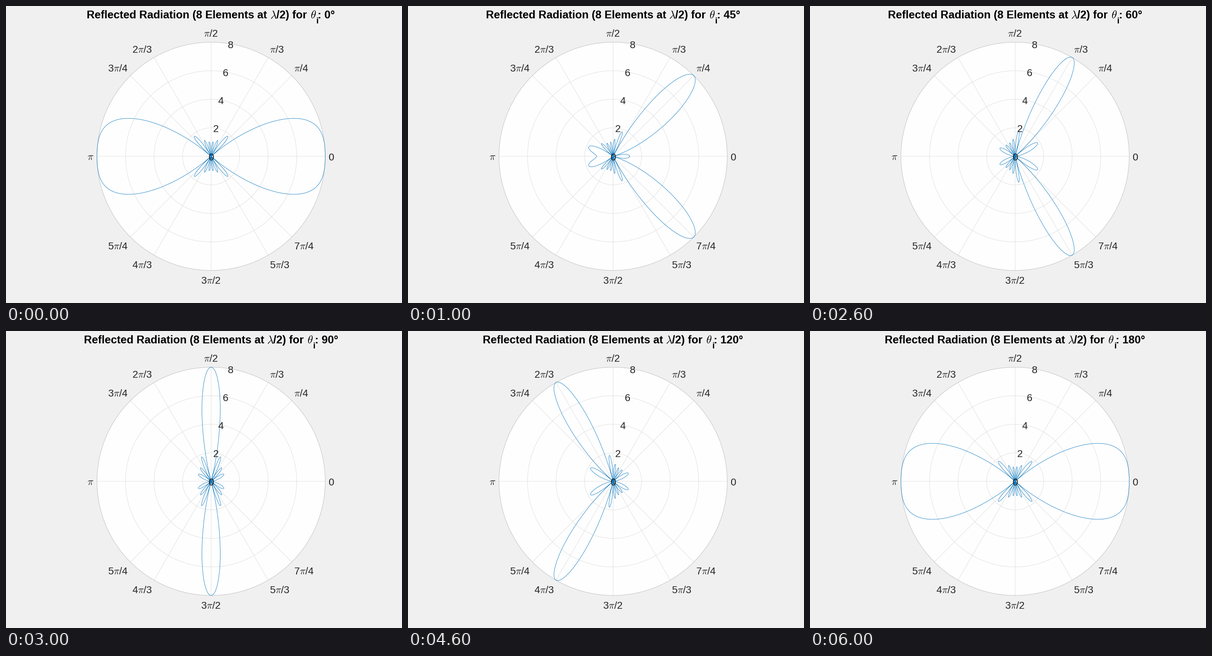
These frames come from a looping animation (864 px wide and 648 px high, 7 s). A matplotlib script:

```python
import numpy as np
import matplotlib.pyplot as plt
from matplotlib.animation import FuncAnimation

W, H, DPI = 864, 648, 100
CX, CY, R = 447.5, 328, 249
ELEMENTS = 8
ANGLES = [0, 45, 60, 90, 120, 135, 180]
PX = 72 / DPI  # points per pixel
GRID, RIM, INK, BLUE = "#dfdfdf", "#c0c0c0", "#262626", "#0072bd"

plt.rcParams["font.family"] = "Liberation Sans"
plt.rcParams["mathtext.fontset"] = "cm"

fig = plt.figure(figsize=(W / DPI, H / DPI), dpi=DPI, facecolor="#f0f0f0")
ax = fig.add_axes([0, 0, 1, 1])
ax.set_xlim(0, W)
ax.set_ylim(H, 0)
ax.axis("off")

theta = np.linspace(0, 2 * np.pi, 2001)


def to_xy(angle, radius):
    """Polar to stage pixels, radius in data units (0 to 8)."""
    r = radius * R / ELEMENTS
    return CX + r * np.cos(angle), CY - r * np.sin(angle)


def stroke(x, y, color, z, width=0.9):
    return ax.plot(x, y, color=color, lw=width * PX, zorder=z, snap=False)[0]


def label(x, y, s, size=22, color=INK, **kw):
    return ax.text(x, y, s, fontsize=size * PX, color=color, zorder=5,
                   va="baseline", **kw)


def array_factor(incidence):
    psi = np.pi * (np.cos(theta) - np.cos(np.radians(incidence)))
    return abs(sum(np.exp(1j * n * psi) for n in range(ELEMENTS)))


# Polar grid
ax.fill(*to_xy(theta, 8), color="#fefefe", lw=0, zorder=0)
for deg in (0, 45, 60, 90, 120, 135, 180, 225, 240, 270, 300, 315):
    x, y = to_xy(np.radians(deg), 8)
    stroke([CX, x], [CY, y], GRID, 1)
for r in (2, 4, 6):
    stroke(*to_xy(theta, r), GRID, 1)
stroke(*to_xy(theta, 8), RIM, 2)

# Tick labels: text, centre x, centre y
ticks = [
    ("0", 709.5, 329), (r"$\pi$/4", 644, 135), (r"$\pi$/3", 591, 94),
    (r"$\pi$/2", 447, 59), (r"2$\pi$/3", 297, 94), (r"3$\pi$/4", 244, 135),
    (r"$\pi$", 184, 329), (r"5$\pi$/4", 244, 523), (r"4$\pi$/3", 297, 564),
    (r"3$\pi$/2", 446.5, 598), (r"5$\pi$/3", 597, 564),
    (r"7$\pi$/4", 650, 523),
]
ticks += [(str(r), 447 + 5.4 * r, 329 - 30.65 * r) for r in range(0, 9, 2)]
for s, x, y in ticks:
    label(x, y + 7.7, s, ha="center")

# Title pieces, placed for a two-digit angle
pieces = [
    (169.5, 27, "Reflected Radiation (8 Elements at ", 24, "bold"),
    (569, 27, r"$\lambda$", 24, "normal"),
    (583, 27, "/2) for ", 24, "bold"),
    (657, 27, r"$\theta$", 24, "normal"),
    (670, 38, "i", 19.2, "bold"),
    (673.7, 27, "", 24, "bold"),
]
title = [label(x, y, s, size, "black", weight=weight, ha="left")
         for x, y, s, size, weight in pieces]
DIGIT = 13.35

curve = stroke([], [], BLUE, 3, 0.75)


def update(i):
    angle = ANGLES[i]
    curve.set_data(*to_xy(theta, array_factor(angle)))
    shift = (2 - len(str(angle))) * DIGIT / 2
    for text, piece in zip(title, pieces):
        text.set_x(piece[0] + shift)
    title[-1].set_text(f": {angle}°")
    return [curve, *title]


anim = FuncAnimation(fig, update, frames=len(ANGLES), interval=1000,
                     init_func=lambda: update(0), repeat=True, repeat_delay=0)
plt.show()
```
